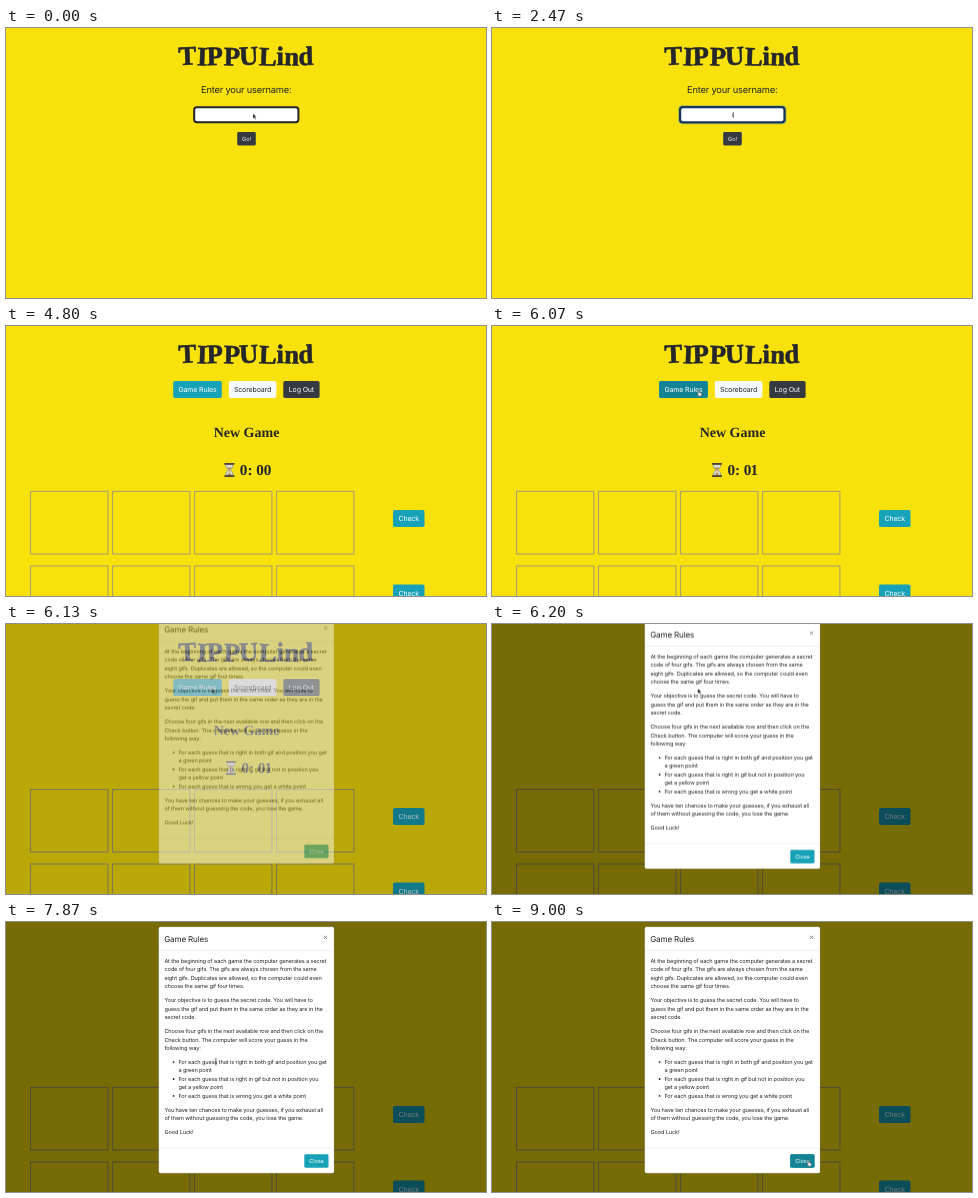
Write an HTML page that moves like this. It is 480x270 px and loops after 9790 ms.

```html
<!DOCTYPE html>
<html lang="en">
<head>
<meta charset="utf-8">
<title>Guessing game</title>
<style>
  html, body { margin: 0; width: 100%; height: 100%; overflow: hidden; background: #f9e10b; }
  svg { display: block; width: 100%; height: 100%; }
  text { font-family: Inter, Roboto, sans-serif; font-size: 5.6px; letter-spacing: -.02em; fill: #212529; text-rendering: geometricPrecision; }
  .mid { text-anchor: middle; }
  .slab { font-family: "Liberation Serif", "Noto Serif", serif; font-weight: 700; letter-spacing: 0; fill: #24262b; }
  .title { font-size: 26.6px; stroke: #24262b; stroke-width: .6; }
  .lg { font-size: 7px; }
  .light { fill: #fff; }
  .teal { fill: #17a2b8; }
  .hover { fill: #138496; }
  .dark { fill: #343a40; }
  .pale { fill: #f8f9fa; }
  .slot { fill: none; stroke: #aca36a; stroke-width: 1.1; }
  .rule { stroke: #dee2e6; stroke-width: .5; }
</style>
</head>
<body>
<svg viewBox="0 0 480 270">
  <rect width="480" height="270" fill="#f9e10b"/>
  <text class="slab title mid" x="240.3" y="37.3" rotate="-3 2 -2 2 -3 2 0 2 -2">TIPPULind</text>

  <g id="login">
    <text class="mid" x="240.3" y="64.8" style="font-size:9.3px">Enter your username:</text>
    <rect id="ring" x="186.2" y="77.2" width="108.2" height="19" rx="3.8" fill="#007bff" fill-opacity=".35"/>
    <rect x="188.2" y="79.2" width="104.2" height="15" rx="2.6" fill="#fff" stroke="#22252d" stroke-width="2"/>
    <rect id="focus" x="188.2" y="79.2" width="104.2" height="15" rx="2.6" fill="#fff" stroke="#16345a" stroke-width="2"/>
    <g id="typing"></g>
    <rect class="dark" x="231.2" y="104" width="18.6" height="13.5" rx="1.4"/>
    <text class="mid light" x="240.5" y="112.8">Go!</text>
  </g>

  <g id="game">
    <rect class="teal" x="167.2" y="55" width="48.6" height="17" rx="1.8"/>
    <rect id="rulesHover" class="hover" x="167.2" y="55" width="48.6" height="17" rx="1.8"/>
    <text class="mid lg light" x="191.5" y="66">Game Rules</text>
    <rect class="pale" x="222.8" y="55" width="47.6" height="17" rx="1.8"/>
    <text class="mid lg" x="246.5" y="66">Scoreboard</text>
    <rect class="dark" x="277.3" y="55" width="36.3" height="17" rx="1.8"/>
    <text class="mid lg light" x="295.4" y="66">Log Out</text>
    <text class="slab mid" x="240.5" y="110.8" style="font-size:14px">New Game</text>
    <g id="time0">
      <use href="#hourglass" x="223.4" y="144"/>
      <text class="slab" x="233.8" y="149.3" style="font-size:15.2px">0: 00</text>
    </g>
    <g id="time1">
      <use href="#hourglass" x="225" y="144"/>
      <text class="slab" x="235.4" y="149.3" style="font-size:15.2px">0: 0<tspan dx="-1">1</tspan></text>
    </g>
    <g id="rows"></g>
  </g>

  <rect id="backdrop" width="480" height="270" fill="#000" fill-opacity=".52"/>
  <g id="modal">
    <rect x="152.7" y="4.8" width="175.4" height="246.4" rx="1.6" fill="#fff" stroke="#000" stroke-opacity=".3" stroke-width=".4"/>
    <text x="158.2" y="20" style="font-size:8.1px">Game Rules</text>
    <path d="M318 13.8l3.2 3.2m0-3.2l-3.2 3.2" stroke="#777" stroke-width=".8"/>
    <path class="rule" d="M153 28.7h175M153 225.9h175"/>
    <g id="copy"></g>
    <rect class="teal" x="298.3" y="232.3" width="24.2" height="13.4" rx="1.4"/>
    <rect id="closeHover" class="hover" x="298.3" y="232.3" width="24.2" height="13.4" rx="1.4"/>
    <text class="mid light" x="310.4" y="241.1">Close</text>
  </g>

  <g id="cursor">
    <path id="arrow" d="M0 0v5l1.2-1 .9 1.9.9-.4-.9-1.9h1.5z" fill="#111" stroke="#fff" stroke-width=".35"/>
    <path id="hand" d="M0 .2q.6-.6 1.1 0l.3 1.7 2.2.6q.6.3.4 1.2l-.5 2.1h-2.4L-.8 3.6q.1-.7.9-.3z" fill="#fff" stroke="#111" stroke-width=".5"/>
    <path id="beam" d="M-1.2 0q1 0 1.2.7Q.2 0 1.2 0M0 .7v4.9m-1.2.7q1 0 1.2-.7.2.7 1.2.7" fill="none" stroke="#222" stroke-width=".6"/>
  </g>

  <defs>
    <g id="hourglass">
      <path d="M-3.8-5.5h7.6q0 3.8-2.8 5.5 2.8 1.7 2.8 5.5h-7.6q0-3.8 2.8-5.5-2.8-1.7-2.8-5.5z" fill="#d9dfd6" stroke="#77786f" stroke-width=".6"/>
      <path d="M-2.6-2.4h5.2L.3.2V3L2.9 5.2h-5.8L-.3 3V.2z" fill="#b98a4e"/>
      <path d="M-5-6.9H5v1.7H-5zM-5 5.2H5v1.7H-5z" fill="#4b433c"/>
    </g>
  </defs>
</svg>
<script>
const LOOP = 9790;
const byId = id => document.getElementById(id);
const animate = (el, frames) => el.animate(frames, { duration: LOOP, iterations: Infinity });
const at = (ms, props, easing = 'linear') => ({ offset: ms / LOOP, easing, ...props });

// Visible only inside the given [from, to] spans, with hard switches.
function show(id, ...spans) {
  const inside = ms => spans.some(([from, to]) => ms >= from && ms < to);
  const times = [...new Set([0, ...spans.flat(), LOOP])];
  animate(byId(id), times.map(ms => at(ms, { opacity: inside(ms) ? 1 : 0 }, 'step-end')));
}

// Typed name, growing around the centre of the field
const typed = [['i', 2465, 2670, 1.1], ['iv', 2670, 2800, 2.4], ['ivo', 2800, 4200, 4.2]];
byId('typing').innerHTML = typed.map(([word, , , half]) =>
  `<g id="${word}"><text class="mid" x="240.3" y="89">${word}</text><path d="M${240.4 + half} 83.8v6.2" stroke="#222" stroke-width=".5"/></g>`).join('');

// Guess rows
const row = y => [0, 1, 2, 3].map(i =>
  `<rect class="slot" x="${24.5 + i * 82}" y="${y}" width="77.4" height="62.6"/>`).join('') +
  `<rect class="teal" x="387" y="${y + 18.6}" width="31.5" height="17" rx="1.8"/>` +
  `<text class="mid lg light" x="402.7" y="${y + 29.6}">Check</text>`;
byId('rows').innerHTML = row(165.4) + row(240);

const copy = [
  ['At the beginning of each game the computer generates a secret', 'code of four gifs. The gifs are always chosen from the same', 'eight gifs. Duplicates are allowed, so the computer could even', 'choose the same gif four times.'],
  ['Your objective is to guess the secret code. You will have to', 'guess the gif and put them in the same order as they are in the', 'secret code.'],
  ['Choose four gifs in the next available row and then click on the', 'Check button. The computer will score your guess in the', 'following way:'],
  ['•For each guess that is right in both gif and position you get', ' a green point', '•For each guess that is right in gif but not in position you', ' get a yellow point', '•For each guess that is wrong you get a white point'],
  ['You have ten chances to make your guesses, if you exhaust all', 'of them without guessing the code, you lose the game.'],
  ['Good Luck!']
];
let y = 41;
for (const paragraph of copy) {
  for (const line of paragraph) {
    const bullet = line[0] === '•', listed = bullet || line[0] === ' ';
    byId('copy').innerHTML += (bullet ? `<circle cx="167.6" cy="${y - 1.9}" r=".9" fill="#212529"/>` : '') +
      `<text x="${listed ? 172.4 : 158.4}" y="${y}">${listed ? line.slice(1) : line}</text>`;
    y += 8.45;
  }
  y += 5.5;
}

show('login', [0, 4200]);
show('game', [4200, LOOP]);
show('ring', [1640, 4200]);
show('focus', [1640, 4200]);
typed.forEach(([word, from, to]) => show(word, [from, to]));
show('time0', [4200, 5130]);
show('time1', [5130, LOOP]);
show('rulesHover', [5670, 6130]);
show('closeHover', [8470, LOOP]);
show('arrow', [0, 2465], [3070, 4200], [4867, 5670], [6100, 6700], [7980, 8470]);
show('hand', [5670, 6100], [8470, LOOP]);
show('beam', [6700, 7980]);

const fadeIn = [[0, 0], [6075, 0], [6190, 1], [LOOP, 1]].map(([ms, opacity]) => at(ms, { opacity }));
animate(byId('backdrop'), fadeIn);
animate(byId('modal'), fadeIn);
const lift = dy => ({ transform: `translate(0px, ${dy}px)` });
animate(byId('modal'), [at(0, lift(-17.5)), at(6065, lift(-17.5), 'ease-out'), at(6365, lift(0)), at(LOOP, lift(0))]);

const path = [
  [0, 247, 85.5], [730, 247, 85.5], [1000, 256, 66], [1330, 226, 107], [1600, 240, 85], [1930, 240, 85],
  [2130, 147, 107], [3070, 147, 107], [3550, 205, 135], [4000, 241, 110], [4800, 241, 112],
  [5130, 256, 152], [5270, 256, 152], [5800, 205.8, 64.5], [6430, 205.8, 64.5], [6930, 209.7, 136.5],
  [7870, 209.7, 136.5], [8130, 284, 236], [8400, 284, 236], [8730, 315.6, 238.6], [LOOP, 315.6, 238.6]
];
animate(byId('cursor'), path.map(([ms, x, y]) => at(ms, { transform: `translate(${x}px, ${y}px)` }, 'ease-in-out')));
</script>
</body>
</html>
```
